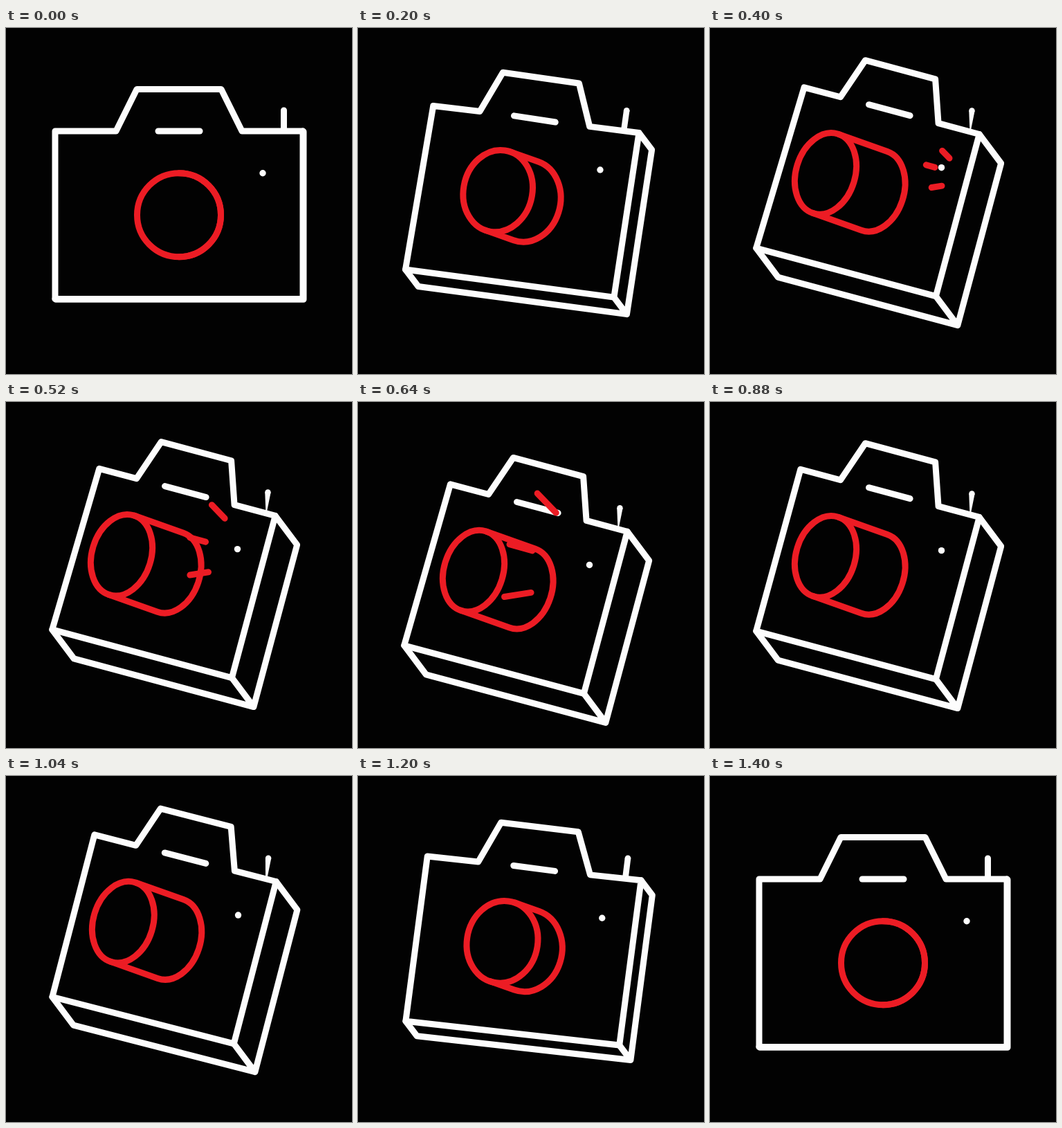
An HTML page that plays this animation: 500 px wide and 500 px high, repeating every 2000 ms.

```html
<!DOCTYPE html>
<html lang="en">
<head>
<meta charset="utf-8">
<title>Camera</title>
<style>
  html, body { margin: 0; width: 100%; height: 100%; overflow: hidden; background: #020202; }
  svg { display: block; width: 100%; height: 100%; }
  .line { fill: none; stroke: #fdfdfd; stroke-width: 9; stroke-linecap: round; stroke-linejoin: round; }
  .red { stroke: #ec1c24; }
  .lens { vector-effect: non-scaling-stroke; }
  .solid { fill: #fdfdfd; }
</style>
</head>
<body>
<svg viewBox="0 0 500 500">
  <g id="camera">
    <path id="back" class="line"/>
    <path id="mast" class="solid"/>
    <circle id="knob" class="solid"/>
    <path id="body" class="line"/>
    <path id="slot" class="line"/>
    <g id="lens">
      <path id="barrel" class="line red lens"/>
      <circle class="line red lens" r="1"/>
    </g>
    <circle id="dot" class="solid" r="4.7"/>
    <path id="sparks" class="line red"/>
  </g>
</svg>
<script>
const LOOP = 2000;
const TURN_END = 363, RETURN_START = 1000, RETURN_END = 1400;
const KICK_START = 360, KICK_PEAK = 600, KICK_END = 1040;
const SPARK_START = 345, SPARK_END = 705;

const rad = deg => deg * Math.PI / 180;
const clamp = x => Math.max(0, Math.min(1, x));
const span = (t, a, b) => clamp((t - a) / (b - a));
const smooth = x => x * x * (3 - 2 * x);
const mix = (a, b, k) => a + (b - a) * k;
const add = (p, q) => [p[0] + q[0], p[1] + q[1]];
const polar = (r, deg) => [r * Math.cos(rad(deg)), r * Math.sin(rad(deg))];
const path = points => "M" + points.map(p => p.map(v => v.toFixed(2)).join(" ")).join("L");

function place(id, attrs) {
  const node = document.getElementById(id);
  for (const name in attrs) node.setAttribute(name, attrs[name]);
}

// Right half of the outline, measured from the lens centre; the left half mirrors it.
const half = [[61, -181.5], [91, -121], [179, -121], [179, 121.4]];
const outline = [...half.map(([x, y]) => [-x, y]).reverse(), ...half];

// Moves a point of the flat front towards the turned pose: squeezed sideways, then rotated.
function pose([x, y], k) {
  const sx = Math.sign(x) * (10 + 0.695 * Math.abs(x));
  const turned = add([228, 235.4], add(polar(sx, 15), polar(y, 105)));
  return [mix(250 + x, turned[0], k), mix(270 + y, turned[1], k)];
}

function drawBody(k, lag) {
  const body = outline.map(p => pose(p, k));
  body[1] = add(body[1], [7 * lag, 2 * lag]);
  const depth = [mix(1, 31.5, k), mix(0.8, 42, k)];
  const [bl, tr, br] = [body[0], body[6], body[7]];
  const [blBack, trBack, brBack] = [bl, tr, br].map(p => add(p, depth));
  place("body", { d: path(body) + "Z" });
  place("back", { d: path([tr, trBack, brBack, blBack, bl]) + path([br, brBack]) });
  place("slot", { d: path([pose([-30, -121], k), pose([30, -121], k)]) });
  const [cx, cy] = pose([121, -60.3], k);
  place("dot", { cx, cy });
}

function drawMast(k) {
  const taper = k ** 5;
  const [x, y] = pose([151.5, -151], k);
  const foot = add(pose([151.5, -121], k), [5.5 * taper, -taper]);
  const r = mix(4.5, 4.2, k), w = mix(4.5, 0.8, taper);
  place("knob", { cx: x, cy: y, r });
  place("mast", {
    d: path([[x - r, y], [x + r, y], add(foot, [w, 0]), add(foot, [-w, 0])]) + "Z"
  });
}

function drawLens(k) {
  const [ax, ay] = polar(42.8, 17), [bx, by] = polar(60, 107);
  const m = [mix(60.5, ax, k), mix(0, ay, k), mix(0, bx, k), mix(60.5, by, k)];
  place("lens", {
    transform: `matrix(${m.join(" ")} ${mix(250, 167, k)} ${mix(270.2, 210.2, k)})`
  });

  // Barrel offset and tangent points in the space of the unit circle
  const dx = 70.5 * k, dy = 25 * k;
  const det = m[0] * m[3] - m[1] * m[2];
  const u = (m[3] * dx - m[2] * dy) / det, v = (m[0] * dy - m[1] * dx) / det;
  const a = Math.atan2(v, u);
  const x = Math.sin(a), y = -Math.cos(a);
  place("barrel", {
    d: `M${x} ${y}L${x + u} ${y + v}A1 1 0 0 1 ${u - x} ${v - y}L${-x} ${-y}`
  });
}

// Sparks fly along their own direction and grow on the way.
function drawSparks(t) {
  const fly = (t - 400) / 240;
  const spark = (x, y, deg, size) => {
    const tail = add([x, y], polar(86 * fly * size, deg));
    return path([tail, add(tail, polar((15 + 24 * fly) * size, deg))]);
  };
  const lit = t > SPARK_START && t < SPARK_END;
  place("sparks", {
    d: lit ? spark(346, 188, 226, 1) + spark(325, 201.2, 195.5, 0.88) + spark(335, 228, 171, 1) : ""
  });
}

function kick(t) {
  if (t < KICK_PEAK) return 37.4 * span(t, KICK_START, KICK_PEAK) ** 3;
  return mix(37.4, -0.7, span(t, KICK_PEAK, KICK_END));
}

function draw(t) {
  const back = smooth(span(t, RETURN_START, RETURN_END));
  const k = t < RETURN_START ? smooth(span(t, 0, TURN_END)) : 1 - back;
  const lag = k * (1 - span(t, TURN_END, RETURN_START));
  place("camera", { transform: `translate(0 ${kick(t) * (1 - back)})` });
  drawBody(k, lag);
  drawMast(k);
  drawLens(k);
  drawSparks(t);
}

let start = null;
function tick(now) {
  if (start === null) start = now;
  draw((now - start) % LOOP);
  requestAnimationFrame(tick);
}
draw(0);
requestAnimationFrame(tick);
</script>
</body>
</html>
```
